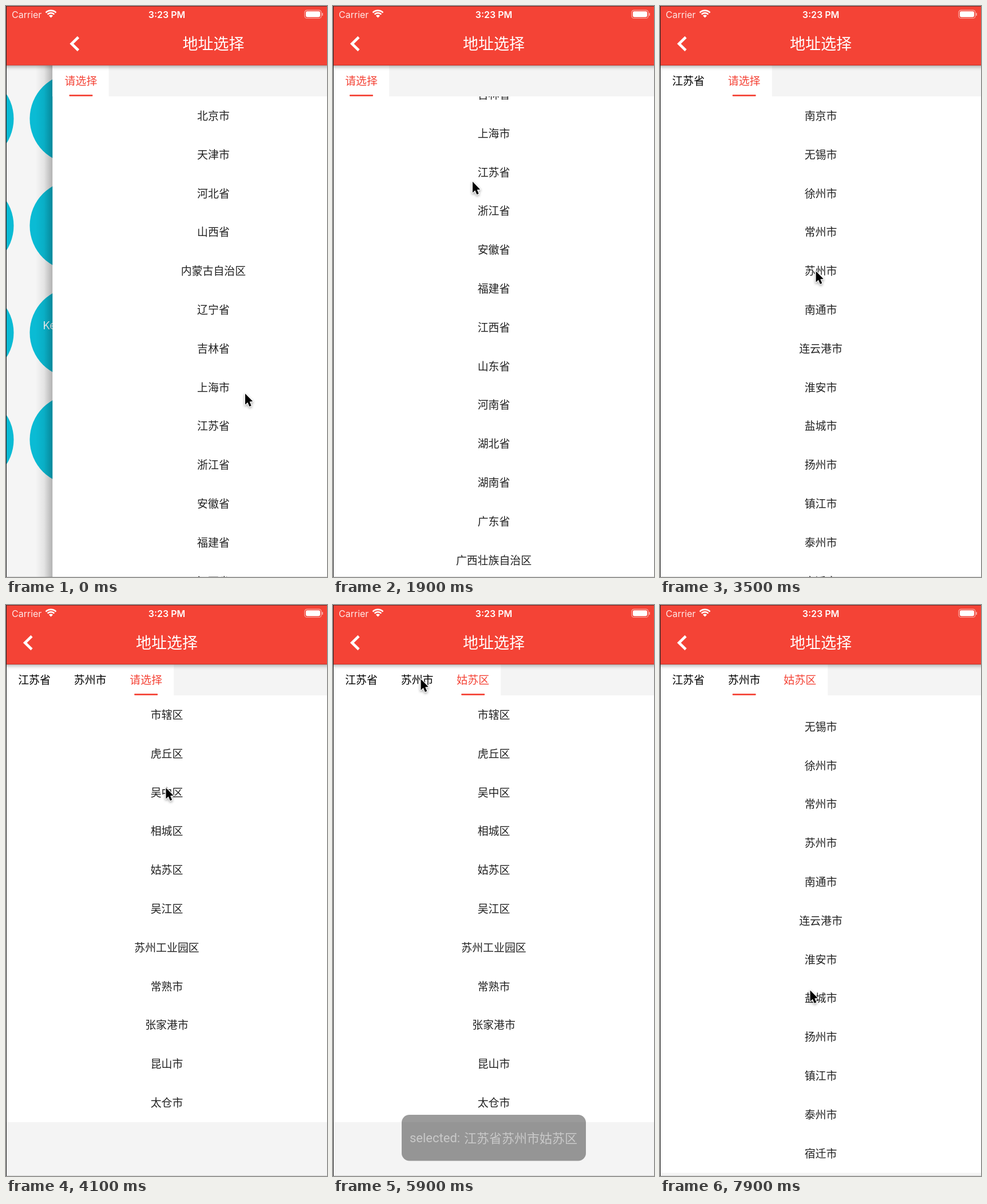
Recreate the animation shown at these times as an HTML page with a canvas. Size 561 px wide and 998 px high, loop 8 s.

```html
<!DOCTYPE html>
<html lang="zh-CN">
<head>
<meta charset="utf-8">
<title>地址选择</title>
<style>
html, body { margin: 0; width: 100%; height: 100%; overflow: hidden; background: #f4f4f4; }
canvas { display: block; width: 561px; height: 998px; }
</style>
</head>
<body>
<canvas id="stage"></canvas>
<script>
const W = 561, H = 998, LOOP = 8000;
const ROW = 67.8, TOP = 158, BAR = 104, TAB = 97.6;
const RED = '#f44336', GRAY = '#f4f4f4', INK = '#212121';
const CJK = '"Noto Sans CJK SC", "Noto Sans CJK", sans-serif';
const UI = 'Inter, "Noto Sans CJK SC", sans-serif';

const provinces = ('北京市 天津市 河北省 山西省 内蒙古自治区 辽宁省 吉林省 上海市 江苏省 浙江省 安徽省 福建省 ' +
  '江西省 山东省 河南省 湖北省 湖南省 广东省 广西壮族自治区 海南省 重庆市 四川省 贵州省 云南省').split(' ');
const cities = '南京市 无锡市 徐州市 常州市 苏州市 南通市 连云港市 淮安市 盐城市 扬州市 镇江市 泰州市 宿迁市'.split(' ');
const districts = '市辖区 虎丘区 吴中区 相城区 姑苏区 吴江区 苏州工业园区 常熟市 张家港市 昆山市 太仓市'.split(' ');

// Tap times
const PICK_PROVINCE = 2290, PICK_CITY = 3560, PICK_DISTRICT = 4850, BACK_TO_CITY = 6450;

// Rows of [time, value...]
const cursorKeys = [
  [0, 417.5, 677], [600, 268, 618], [800, 268, 618], [1150, 262, 430], [1500, 258, 400],
  [1650, 258, 400], [2000, 240, 284], [2600, 240, 284], [3000, 262, 400], [3300, 272, 463],
  [3700, 272, 463], [4000, 279, 319], [4150, 279, 319], [4300, 272, 419], [4500, 266, 480],
  [5450, 266, 480], [5900, 153, 129], [6600, 153, 129], [7150, 235, 656], [7250, 235, 656],
  [7500, 286, 724], [7900, 262, 673]
];
const provinceScroll = [[800, 0], [1500, 400], [1650, 400], [2000, 445]];
const cityScroll = [[7500, 0], [7850, 47]];
const toastAlpha = [[4900, 0], [5100, 1], [5800, 1], [6000, 0]];

const canvas = document.getElementById('stage');
const ctx = canvas.getContext('2d');
const ratio = window.devicePixelRatio || 1;
canvas.width = W * ratio;
canvas.height = H * ratio;

const clamp = v => Math.max(0, Math.min(1, v));
const smooth = p => p * p * (3 - 2 * p);
const easeOut = p => 1 - (1 - p) ** 3;

function track(keys, t, ease = smooth) {
  if (t <= keys[0][0]) return keys[0].slice(1);
  for (let i = 1; i < keys.length; i++) {
    const a = keys[i - 1], b = keys[i];
    if (t < b[0]) {
      const p = ease((t - a[0]) / (b[0] - a[0]));
      return a.slice(1).map((v, k) => v + (b[k + 1] - v) * p);
    }
  }
  return keys[keys.length - 1].slice(1);
}

function rect(x, y, w, h, color) {
  ctx.fillStyle = color;
  ctx.fillRect(x, y, w, h);
}

function pill(x, y, w, h, r, color) {
  ctx.fillStyle = color;
  ctx.beginPath();
  ctx.roundRect(x, y, w, h, r);
  ctx.fill();
}

function text(str, x, midY, size, color, { align = 'center', weight = 400, font = CJK } = {}) {
  ctx.font = `${weight} ${size}px ${font}`;
  ctx.textAlign = align;
  ctx.fillStyle = color;
  ctx.fillText(str, x, midY + size * (font === CJK ? 0.38 : 0.36));
}

function line(points, width, color) {
  ctx.beginPath();
  points.forEach(([x, y]) => ctx.lineTo(x, y));
  ctx.lineWidth = width;
  ctx.strokeStyle = color;
  ctx.stroke();
}

function drawHome(x) {
  rect(0, BAR, W, H - BAR, '#f5f5f5');
  for (let row = 0; row < 4; row++) {
    for (let col = 0; col < 3; col++) {
      ctx.fillStyle = '#0abbd4';
      ctx.beginPath();
      ctx.arc(x + 93.5 + col * 187, 197 + row * 187, 79.5, 0, Math.PI * 2);
      ctx.fill();
    }
  }
  text('Ke', x + 224, 558, 18.5, '#fff', { align: 'left', font: UI });
}

function drawList(items, scroll) {
  ctx.save();
  ctx.beginPath();
  ctx.rect(0, TOP, W, H - TOP);
  ctx.clip();
  rect(0, TOP - scroll, W, items.length * ROW, '#fff');
  items.forEach((name, i) => text(name, 281, TOP + (i + 0.5) * ROW - scroll, 18.9, INK));
  ctx.restore();
}

function drawRipple(t, start, y, x, top, end) {
  const p = (t - start) / 450;
  if (p < 0 || t > end) return;
  const fade = 1 - clamp((t - start - 350) / 300);
  if (!fade) return;
  ctx.save();
  ctx.beginPath();
  ctx.rect(0, top, W, ROW);
  ctx.clip();
  ctx.globalAlpha = fade;
  rect(0, top, W, ROW, `rgba(0,0,0,${0.06 * clamp(p * 3)})`);
  ctx.fillStyle = 'rgba(0,0,0,.06)';
  ctx.beginPath();
  ctx.arc(x, y, 20 + 290 * easeOut(clamp(p)), 0, Math.PI * 2);
  ctx.fill();
  ctx.restore();
}

function drawTabs(t) {
  const names = ['请选择'];
  if (t >= PICK_PROVINCE) names.unshift('江苏省');
  if (t >= PICK_CITY) names.splice(1, 0, '苏州市');
  if (t >= PICK_DISTRICT) names[2] = '姑苏区';
  rect(0, BAR, W, TOP - BAR, GRAY);
  rect(0, BAR, names.length * TAB + 0.5, TOP - BAR, '#fff');
  names.forEach((name, i) =>
    text(name, 49.5 + i * TAB, 131, 18.9, i === names.length - 1 ? RED : '#000'));
  const move = start => easeOut(clamp((t - start) / 400));
  const at = move(PICK_PROVINCE) + move(PICK_CITY) - move(BACK_TO_CITY);
  pill(29 + at * TAB, 155, 41, 2.8, 1, RED);
}

function drawPage(t, x) {
  ctx.save();
  ctx.translate(x, 0);
  if (x > 0.5) {
    const shade = ctx.createLinearGradient(-30, 0, 0, 0);
    shade.addColorStop(0, 'rgba(0,0,0,0)');
    shade.addColorStop(0.5, 'rgba(0,0,0,.07)');
    shade.addColorStop(1, 'rgba(0,0,0,.28)');
    rect(-30, BAR, 30, H - BAR, shade);
  }
  rect(0, BAR, W, H - BAR, GRAY);
  if (t < PICK_PROVINCE) {
    const [s] = track(provinceScroll, t, easeOut);
    drawList(provinces, s);
    drawRipple(t, 2190, 290, 240, TOP + 8 * ROW - s - ROW * 0.0, PICK_PROVINCE);
  } else if (t < PICK_CITY || t >= BACK_TO_CITY) {
    drawList(cities, track(cityScroll, t)[0]);
  } else {
    drawList(districts, 0);
    drawRipple(t, 4780, 480, 266, TOP + 4 * ROW, 5600);
  }
  drawTabs(t);
  ctx.restore();
}

function drawStatus() {
  text('Carrier', 10, 15, 16, 'rgba(255,255,255,.88)', { align: 'left', font: UI });
  text('3:23 PM', 281, 15, 16, '#fff', { weight: 600, font: UI });

  // Wi-Fi fan
  const cx = 78.5, cy = 20.5, a = Math.PI * 0.25;
  ctx.strokeStyle = ctx.fillStyle = '#fff';
  ctx.lineWidth = 2.7;
  for (const r of [12.6, 8.3]) {
    ctx.beginPath();
    ctx.arc(cx, cy, r, -Math.PI + a, -a);
    ctx.stroke();
  }
  ctx.beginPath();
  ctx.moveTo(cx, cy);
  ctx.arc(cx, cy, 5, -Math.PI + a, -a);
  ctx.fill();

  // Battery
  ctx.strokeStyle = 'rgba(255,255,255,.55)';
  ctx.lineWidth = 1.2;
  ctx.beginPath();
  ctx.roundRect(522, 7.3, 29, 14.2, 4);
  ctx.stroke();
  pill(524, 9.3, 25, 10.2, 2.4, '#fff');
  pill(552.2, 12, 1.7, 5, 1, 'rgba(255,255,255,.6)');
}

function drawHeader(x) {
  ctx.save();
  ctx.shadowColor = 'rgba(0,0,0,.35)';
  ctx.shadowBlur = 7 * ratio;
  ctx.shadowOffsetY = 2 * ratio;
  rect(-10, 0, W + 20, BAR - 0.5, RED);
  ctx.restore();
  line([[x + 45, 54.5], [x + 33.2, 66], [x + 45, 77.5]], 4.6, '#fff');
  text('地址选择', x + 281, 66, 27, '#fff', { weight: 500 });
  drawStatus();
}

function drawToast(alpha) {
  if (alpha <= 0) return;
  ctx.save();
  ctx.globalAlpha = alpha;
  pill(120, 891, 322, 80.5, 13.5, 'rgba(0,0,0,.8)');
  text('selected: ', 134, 931.5, 22, '#fff', { align: 'left', font: 'Roboto, sans-serif' });
  text('江苏省苏州市姑苏区', 229, 931.5, 22, '#fff', { align: 'left' });
  ctx.restore();
}

function drawCursor(x, y) {
  const arrow = [[0, 0], [0, 19.2], [4.3, 15.2], [7.4, 22.4], [10.7, 21], [7.7, 14], [13.2, 13.6]];
  ctx.save();
  ctx.translate(x + 0.5, y + 0.5);
  ctx.beginPath();
  arrow.forEach(([px, py]) => ctx.lineTo(px, py));
  ctx.closePath();
  ctx.shadowColor = 'rgba(0,0,0,.4)';
  ctx.shadowBlur = 4 * ratio;
  ctx.shadowOffsetY = 2 * ratio;
  ctx.lineWidth = 2.4;
  ctx.lineJoin = 'round';
  ctx.strokeStyle = '#fff';
  ctx.stroke();
  ctx.shadowColor = 'transparent';
  ctx.fillStyle = '#000';
  ctx.fill();
  ctx.restore();
}

function draw(t) {
  ctx.setTransform(ratio, 0, 0, ratio, 0, 0);
  const x = 82 * (1 - clamp(t / 450)) ** 3;
  if (x > 0) drawHome((x - 560) / 3);
  drawPage(t, x);
  drawHeader(x);
  drawToast(track(toastAlpha, t)[0]);
  rect(0, 0, W, 1, 'rgba(40,20,20,.6)');
  rect(0, H - 1, W, 1, 'rgba(0,0,0,.12)');
  rect(0, 0, 1, H, '#1c1c1c');
  drawCursor(...track(cursorKeys, t));
}

function tick() {
  draw(performance.now() % LOOP);
  requestAnimationFrame(tick);
}
tick();
</script>
</body>
</html>
```
